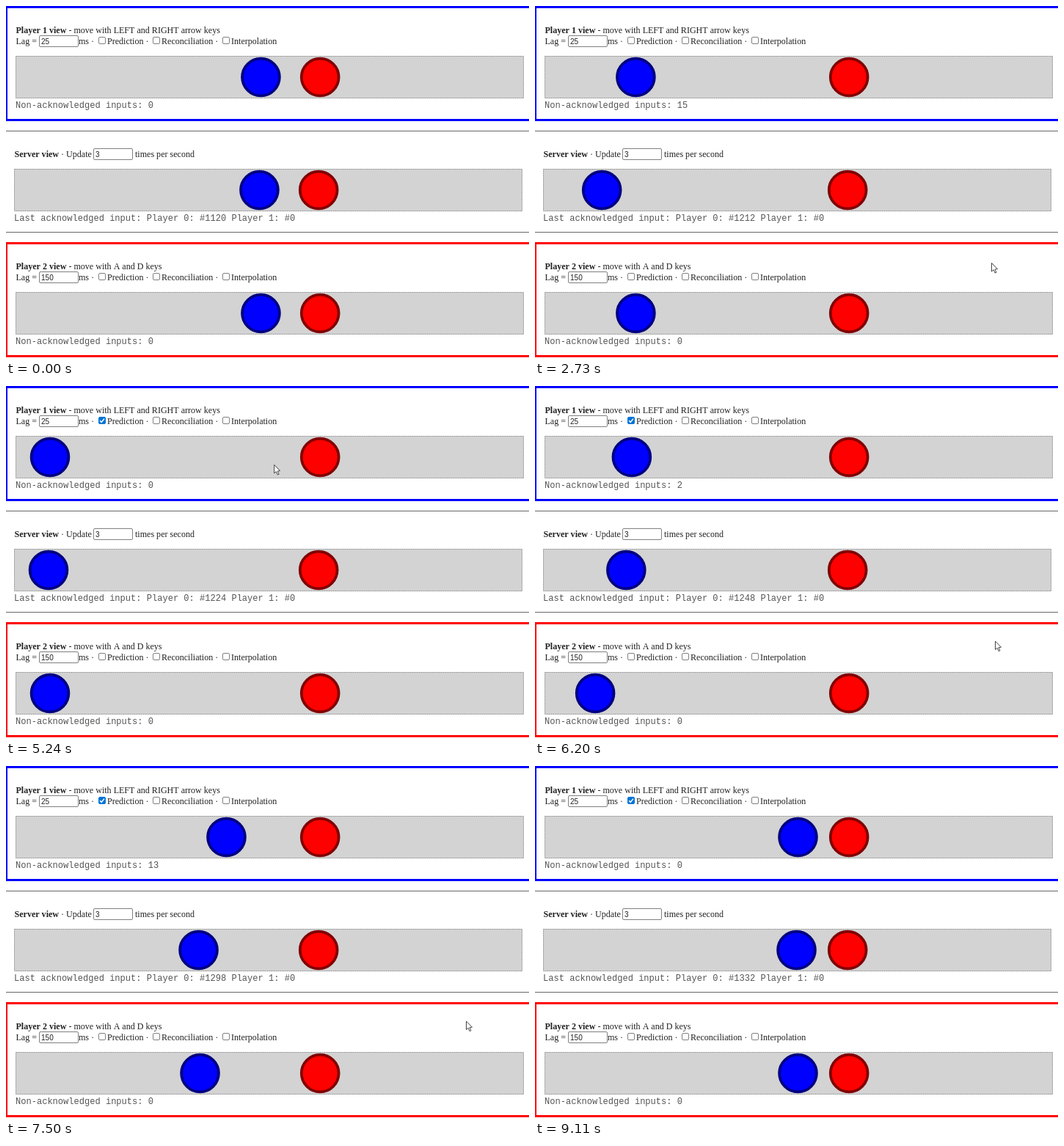
Recreate the animation shown at these times as an HTML page with a canvas. Size 713 px wide and 480 px high, loop 9500 ms.

```html
<!DOCTYPE html>
<html lang="en">
<head>
<meta charset="utf-8">
<title>Client-server lag demo</title>
<style>
  html, body { margin: 0; width: 100%; height: 100%; overflow: hidden; background: #fff; }
  canvas { display: block; }
</style>
</head>
<body>
<canvas id="stage" width="713" height="480"></canvas>
<script>
const ctx = document.getElementById('stage').getContext('2d');
const LOOP = 9500;
const SERIF = '12.06px "Liberation Serif", serif';
const MONO = '12.06px "Liberation Mono", monospace';
const SANS = '10.05px "Liberation Sans", sans-serif';

// Inputs are sent at a fixed rate while a key is held.
const INPUT_MS = 21.2, STEP = 2.764, LEFT_X = 58, TURN = 104, FIRST_SEQ = 1120;
const KEY_HELD = [[699, 2955], [5575, 7885]];
const LAG_1 = 26, LAG_2 = 157, PREDICT_AT = 4450;

// Server ticks: time, inputs acknowledged so far.
const TICKS = [
  [925, 9], [1278, 26], [1640, 43], [2010, 60], [2372, 76], [2715, 92], [3068, 104],
  [5770, 112], [6125, 128], [6480, 145], [6835, 161], [7190, 178], [7530, 195], [7870, 211], [8210, 212]
];

// Pointer: time, x, y.
const POINTER = [
  [0, 675, 482], [20, 674, 477], [150, 650, 420], [320, 614, 341], [520, 622, 350],
  [3270, 622, 350], [3590, 270, 222], [4150, 121, 48], [4380, 130, 46], [4610, 130, 46],
  [5240, 364.5, 106.5], [5560, 584, 257], [5850, 627, 347.5], [8560, 627, 347.5],
  [9110, 705, 482], [LOOP, 705, 482]
];

function lastTick(t) {
  let tick = [0, 0];
  for (const next of TICKS) if (next[0] <= t) tick = next;
  return tick;
}

// Inputs sent since the latest server message reached player 1.
function pendingInputs(t) {
  const received = lastTick(t - LAG_1)[0] + LAG_1;
  let count = 0;
  for (const [down, up] of KEY_HELD) {
    const span = Math.min(t, up) - Math.max(received, down);
    if (span > 0) count += Math.floor(span / INPUT_MS);
  }
  return count;
}

const ballX = inputs => LEFT_X + Math.abs(inputs - TURN) * STEP;

function pointerAt(t) {
  const i = POINTER.findIndex(p => p[0] > t);
  const [t0, x0, y0] = POINTER[i - 1], [t1, x1, y1] = POINTER[i];
  const k = (t - t0) / (t1 - t0);
  return [x0 + (x1 - x0) * k, y0 + (y1 - y0) * k];
}

function text(str, x, y, font = SERIF, color = '#222') {
  ctx.font = font;
  ctx.fillStyle = color;
  ctx.fillText(str, x, y);
  return x + ctx.measureText(str).width;
}

function rect(x, y, w, h, color) {
  ctx.fillStyle = color;
  ctx.fillRect(x, y, w, h);
}

function roundBox(x, y, w, h, fill, stroke) {
  ctx.beginPath();
  ctx.roundRect(x + .5, y + .5, w - 1, h - 1, 1.5);
  ctx.fillStyle = fill;
  ctx.strokeStyle = stroke;
  ctx.lineWidth = 1;
  ctx.fill();
  ctx.stroke();
}

function field(value, x, y) {
  roundBox(x, y, 54, 16, '#fff', '#808080');
  text(value, x + 3, y + 12, SANS);
}

function checkbox(x, y, checked) {
  roundBox(x, y, 10, 10, checked ? '#0075d8' : '#fff', checked ? '#0075d8' : '#808080');
  if (!checked) return;
  ctx.beginPath();
  ctx.moveTo(x + 2, y + 5.2);
  ctx.lineTo(x + 4.2, y + 7.3);
  ctx.lineTo(x + 8, y + 2.6);
  ctx.strokeStyle = '#fff';
  ctx.lineWidth = 1.5;
  ctx.stroke();
}

function ball(x, y, fill, edge) {
  ctx.beginPath();
  ctx.arc(x, y, 25.4, 0, 2 * Math.PI);
  ctx.fillStyle = fill;
  ctx.strokeStyle = edge;
  ctx.lineWidth = 3.77;
  ctx.fill();
  ctx.stroke();
}

function track(x, y, blueX, status) {
  rect(x, y, 693, 58, '#d3d3d3');
  ctx.strokeStyle = '#999';
  ctx.lineWidth = 1;
  ctx.setLineDash([2, 1]);
  ctx.strokeRect(x + .5, y + .5, 692, 57);
  ctx.setLineDash([]);
  ball(blueX, y + 29, '#00f', '#000080');
  ball(x + 415.2, y + 29, '#f00', '#800000');
  text(status, x, y + 71, MONO, '#555');
}

function title(bold, rest, x, y) {
  text(rest, text(bold, x, y, 'bold ' + SERIF), y);
}

function playerPanel(y, color, name, keys, lag, predicts, blueX, pending) {
  rect(0, y, 713, 3, color);
  rect(0, y, 2, 157, color);
  rect(0, y + 154, 713, 3, color);
  title(name, ' - move with ' + keys + ' keys', 13.5, y + 37);
  text('Lag =', 13.5, y + 52);
  field(lag, 45, y + 40);
  text('ms ·', 99, y + 52);
  checkbox(126, y + 42, predicts);
  text('Prediction ·', 138, y + 52);
  checkbox(200, y + 42, false);
  text('Reconciliation ·', 212, y + 52);
  checkbox(295, y + 42, false);
  text('Interpolation', 307, y + 52);
  track(13, y + 68, blueX, 'Non-acknowledged inputs: ' + pending);
}

function pointer([x, y]) {
  const shape = [[0, 0], [0, 11.5], [2.7, 9.2], [4.6, 13.6], [6.4, 12.8], [4.6, 8.5], [8, 8.2]];
  ctx.beginPath();
  for (const [dx, dy] of shape) ctx.lineTo(x + dx + .5, y + dy + .5);
  ctx.closePath();
  ctx.fillStyle = '#fff';
  ctx.strokeStyle = '#444';
  ctx.lineWidth = 1;
  ctx.fill();
  ctx.stroke();
}

function draw(t) {
  const acked = lastTick(t)[1];
  const pending = pendingInputs(t);
  const predicts = t >= PREDICT_AT;
  const blue1 = ballX(lastTick(t - LAG_1)[1] + (predicts ? pending : 0)) + 2;
  const blue2 = ballX(lastTick(t - LAG_2)[1]) + 2;

  rect(0, 0, 713, 480, '#fff');
  playerPanel(0, '#00f', 'Player 1 view', 'LEFT and RIGHT arrow', '25', predicts, blue1, pending);

  rect(0, 170, 713, 1, '#666');
  title('Server view', ' · Update', 11.5, 206);
  field('3', 119, 194);
  text('times per second', 176, 206);
  track(11, 222, ballX(acked),
    `Last acknowledged input: Player 0: #${FIRST_SEQ + acked} Player 1: #0`);
  rect(0, 308, 713, 1, '#666');

  playerPanel(322, '#f00', 'Player 2 view', 'A and D', '150', false, blue2, 0);
  pointer(pointerAt(t));
}

const start = performance.now();
function tick() {
  draw((performance.now() - start) % LOOP);
  requestAnimationFrame(tick);
}
tick();
</script>
</body>
</html>
```
